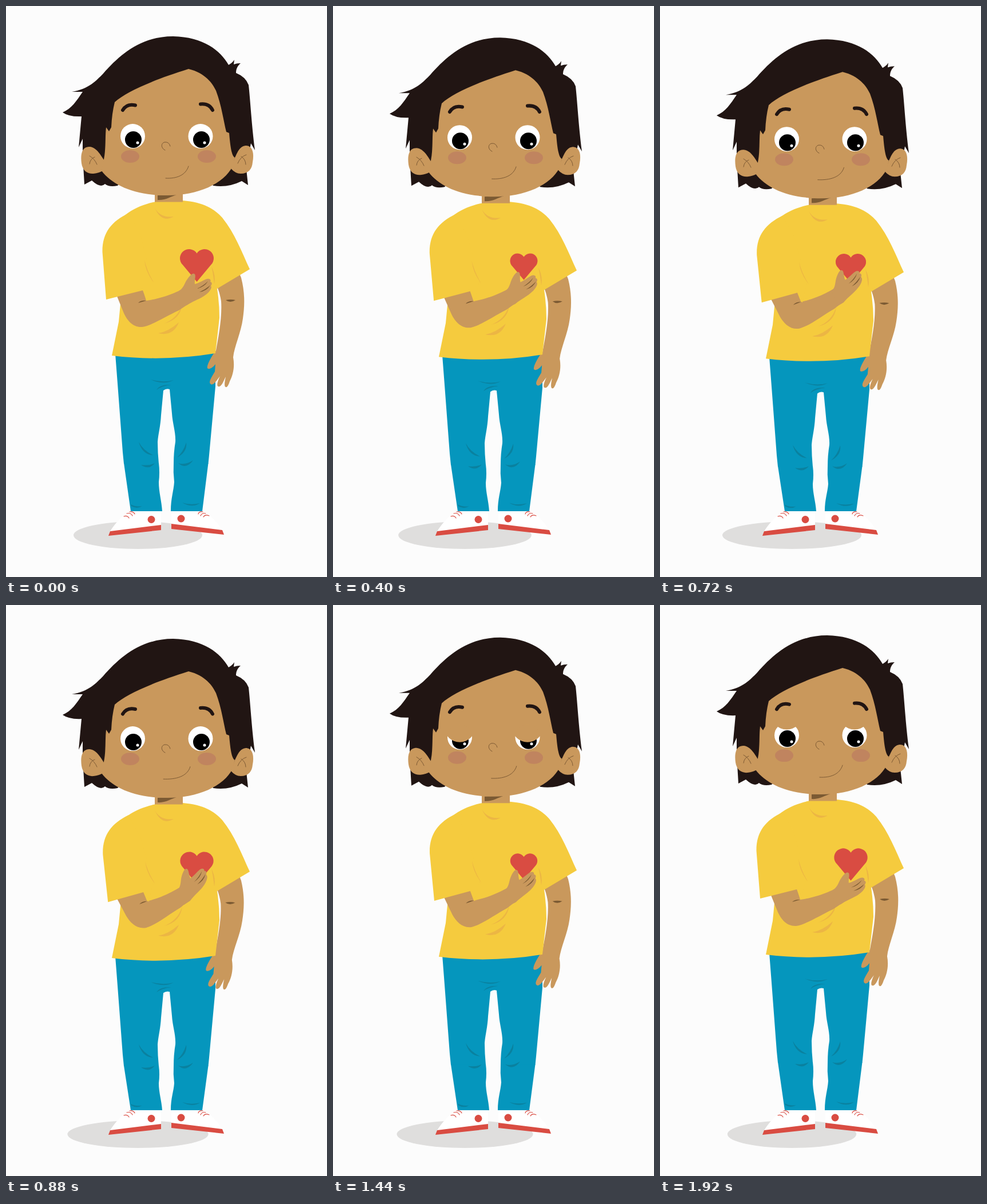
Animation, 561 px wide and 998 px high, one loop 2000 ms. Source, as an HTML page:

```html
<!DOCTYPE html>
<html lang="en">
<head>
<meta charset="utf-8">
<title>Boy with a beating heart</title>
<style>
html, body { margin: 0; width: 100%; height: 100%; overflow: hidden; background: #fcfcfc; }
svg { display: block; width: 100vw; height: 100vh; }
.skin { fill: #c9985c; }
.hair { fill: #211513; }
.shirt { fill: #f5cb3e; }
.fold { fill: #ecb644; }
.jeans { fill: #0596bd; }
.crease { fill: #0a819f; }
.red { fill: #d94c42; }
.dark { fill: #7b5a33; }
.line { fill: none; stroke: #7d5a34; stroke-width: 1; stroke-linecap: round; }
.lace { fill: none; stroke: #d94c42; stroke-width: 1.2; stroke-linecap: round; }
.brow { fill: none; stroke: #211513; stroke-width: 6; stroke-linecap: round; }
</style>
</head>
<body>
<svg viewBox="0 0 561 998">
  <defs>
    <clipPath id="eyeClip"><circle r="22.5"/></clipPath>
  </defs>

  <ellipse id="shadow" cx="230.5" cy="925" rx="112.5" ry="24" fill="#dfdedd"/>

  <g id="shoes">
    <path fill="#fff" d="M218 881 L271 881 V909 L181 920 C190 904 204 890 218 881Z"/>
    <path class="red" d="M182 918 L271 907 V916 L179 926Z"/>
    <circle class="red" cx="254" cy="897.5" r="6.5"/>
    <path class="lace" d="M206 892 q6 -2 9 3 M211 887 q7 -2 10 4 M216 884 q7 -1 9 4"/>
    <path fill="#fff" d="M289 881 H343 C358 890 372 905 379 918 L289 907Z"/>
    <path class="red" d="M289 905 L378 916 L381 924 L289 914Z"/>
    <circle class="red" cx="306" cy="896" r="6.5"/>
    <path class="lace" d="M336 888 q1 -5 8 -4 M340 891 q3 -6 9 -4 M345 893 q3 -5 10 -2"/>
  </g>

  <g id="calves" class="jeans">
    <path d="M206 799 L218 883 H273 C272 865 267 850 267 832 Q269 815 267 799Z"/>
    <path d="M293 799 Q292 815 294 832 C293 848 288 860 288 883 H343 L353.500 799Z"/>
    <path class="crease" d="M218 871 Q227 876 238 874 Q229 880 219 874Z M308 868 Q322 873 339 869 Q325 878 308 868Z"/>
  </g>

  <g id="body">
    <path class="jeans" d="M191 608 L195 660 L204 780 L206 800 H267 Q265 780 265 762 C266 748 270 735 271 715 L275 672 Q280 668 286 670 L290 712 C291 730 297 745 296 762 Q293 780 293 800 H353.500 L355 785 L366 665 V602Z"/>
    <path class="crease" d="M253 653 Q274 659 293 654 Q275 663 253 653Z M263 671 Q269 661 289 662 Q272 664 263 671Z
      M232 762 Q240 777 257 785 Q238 784 232 762Z M236 802 Q250 804 260 799 Q250 812 236 802Z
      M315 763 Q317 780 299 789 Q310 779 315 763Z M301 799 Q313 803 327 794 Q315 811 301 799Z"/>

    <g id="rightArm" class="skin">
      <path d="M368 485 L407 465 L411 475 C418 502 417 525 414 546 C411 570 399 595 397 614 C400 630 397 645 391 656 C389 662 387 667 384 666 C381 665 382 657 384 648 C380 656 376 667 371 665 C367 664 371 653 374 647 C369 653 363 664 358 661 C353 658 359 649 365 639 L366 626 C361 633 354 636 352 633 C350 629 359 612 367 602 C371 580 378 545 376 516 Q374 503 370 493Z"/>
      <path class="dark" d="M384 514 Q393 512 401 514 Q392 520 384 514Z"/>
    </g>

    <path class="skin" d="M260 322 H309 V346 H260Z"/>
    <path class="dark" d="M265 331 L301 329 C287 333 279 340 265 339Z"/>

    <path class="shirt" d="M260 342.500 H309 V340 C345 343 365 355 378 370 C400 397 412 430 426 460 L369 494 Q373 520 373 545 L366 607 Q275 622 185 611 L197 552 L201 510 L180 402 C195 365 232 348 260 342.500Z"/>
    <path class="fold" d="M260 353 Q270 371 293 368 Q272 380 260 353Z M242 444 Q247 465 258 483 Q244 465 242 444Z
      M266 572 Q284 569 302 553 Q292 578 266 572Z M276 555 Q300 546 308 521 Q305 548 276 555Z
      M359 455 Q367 470 364 486 Q362 468 359 455Z"/>

    <path id="heart" class="red" d="M333.500 482 L308.700 452.300 A16 16 0 1 1 333.500 432.400 A16 16 0 1 1 358.300 452.300Z"/>

    <g id="leftArm">
      <g id="forearm">
        <path class="skin" d="M187 490 L236 485 L245 515 C268 512 290 504 306 496 L320 520 L302 532 C280 542 256 558 238 561 C222 562 212 550 206 537Z"/>
        <path class="dark" d="M231 519 Q236 514 245 515 Q238 517 231 519Z"/>
        <g id="hand">
          <path class="skin" d="M302 498 C309 494 311 488 314 482 C318 475 325 466 329 468 C333 470 329 478 330 486 C341 483 350 475 355 477 C358 478 358 480 357 482 C361 483 360 487 358 489 C361 493 355 500 350 504 C340 512 328 515 316 523 L304 526Z"/>
          <path class="dark" d="M334 494 Q345 489 353 481 Q347 491 334 494Z M338 500 Q349 495 357 488 Q351 498 338 500Z"/>
        </g>
      </g>
      <path class="shirt" d="M215 362 C184 376 168 397 168.500 430 L175 513 L239 497 L246 515 L255 480 L235 400Z"/>
      <path class="fold" d="M242 444 Q247 465 258 483 Q244 465 242 444Z"/>
    </g>

    <g id="head">
      <path class="hair" d="M115 150 C145 145 157 131 170 118 C198 86 235 53 292 53 C345 54 375 78 389 103 Q396 99 399 94 L398 102 Q403 100 410 100 C404 105 402 111 402 117 Q419 124 424 138 C427 165 429 205 435 252 L428 240 L420 285 L423 313 L412 306 Q388 318 362 314 L300 200 L195 314 Q180 317 173 311 Q165 319 150 305 L137 312 L134 262 V232 L127 247 L132 193 Q110 194 99 186 C115 179 123 166 134 150Z"/>
      <path class="skin" d="M146 246 C132 246 130 260 132 275 C134 289 144 294 153 293 Q163 292 171 287 L173 272 C166 262 159 247 146 246Z"/>
      <path class="skin" d="M419 244 C408 245 404 257 400 265 L393 284 Q401 293 410 293 C424 293 430 285 431 273 C434 257 431 244 419 244Z"/>
      <path class="line" d="M146 262 Q155 267 159 277 M155 264 Q147 267 146 276 M420 260 Q410 263 405 275 M411 263 Q419 268 419 277"/>
      <path class="skin" d="M190 168 C210 150 255 130 319 110 C348 117 361 135 367 148 C377 175 380 200 385 220 L390 222 C392 245 394 262 400 265 L396 280 C381 311 335 331 282 331 C224 331 186 313 167 288 L171 268 C175 248 173 228 175 212 L180 219 L184 212 Q185 188 190 168Z"/>
      <ellipse cx="217" cy="263" rx="16" ry="11" fill="#c0845f"/>
      <ellipse cx="351" cy="263" rx="16" ry="11" fill="#c0845f"/>
      <g transform="translate(221.500 227.500)" clip-path="url(#eyeClip)">
        <circle r="21.500" fill="#fff"/>
        <circle cx="1" cy="6" r="14.500"/>
        <circle cx="8.500" cy="11.500" r="2.500" fill="#fff"/>
        <circle class="skin lid" r="27"/>
      </g>
      <g transform="translate(340 227.500)" clip-path="url(#eyeClip)">
        <circle r="21.500" fill="#fff"/>
        <circle cx="1.500" cy="6" r="14.500"/>
        <circle cx="7" cy="11.500" r="2.500" fill="#fff"/>
        <circle class="skin lid" r="27"/>
      </g>
      <path id="brows" class="brow" d="M204 182 Q211 170 226 173.500 M361 182 Q355 170 340 171.500"/>
      <path class="line" d="M278 252 C271 249 270 240 277 238 Q285 237 287 245"/>
      <path id="mouth" class="line"/>
    </g>
  </g>
</svg>
<script>
const LOOP = 2000, STEP = 80, FLOOR = 883, KNEE = 800;
const el = id => document.getElementById(id);
const set = (id, name, value) => el(id).setAttribute(name, value);
const move = (id, value) => set(id, 'transform', value);
const lids = document.querySelectorAll('.lid');
const wave = turn => Math.cos(turn * 2 * Math.PI);
const mix = (a, b, k) => a + (b - a) * k;

// Two heartbeats per loop, the second slightly longer.
const heartScale = t => {
  const turn = t < 960 ? t / 960 : (t - 960) / 1040;
  return 0.9 + 0.1 * wave(turn);
};

function pose(t) {
  const k = (1 - wave(t / LOOP)) / 2;
  const drop = 6.3 * k;

  set('shadow', 'rx', 112.5 + 11 * k);
  move('body', `translate(0 ${drop})`);
  const squash = (FLOOR - KNEE - drop) / (FLOOR - KNEE);
  move('calves', `translate(0 ${FLOOR}) scale(1 ${squash}) translate(0 ${-FLOOR})`);

  move('rightArm', `rotate(${0.9 * k} 390 470)`);
  move('leftArm', `rotate(${-1.7 * k} 185 400)`);
  move('forearm', `rotate(${-4.5 * k} 222 535)`);
  move('hand', `rotate(${-14 * k} 315 508)`);
  move('heart', `translate(333.5 453.5) scale(${heartScale(t)}) translate(-333.5 -453.5)`);

  move('brows', `translate(0 ${2.5 * k})`);
  const m = (a, b) => mix(a, b, k).toFixed(2);
  set('mouth', 'd', `M${m(279, 275)} ${m(301, 298)} C${m(298, 296)} ${m(302, 299)} ${m(314, 317)} ${m(296, 294)} ${m(319, 322)} ${m(280, 276.5)}`);

  // One blink, fully shut at 1600 ms.
  const open = Math.min(1, Math.abs(t - 1600) / 400);
  const lift = open < 1 ? -46 * open : -60;
  lids.forEach(lid => lid.setAttribute('cy', lift));
}

const start = performance.now();
function tick() {
  const t = (performance.now() - start) % LOOP;
  pose(Math.floor(t / STEP) * STEP);
  requestAnimationFrame(tick);
}
tick();
</script>
</body>
</html>
```
